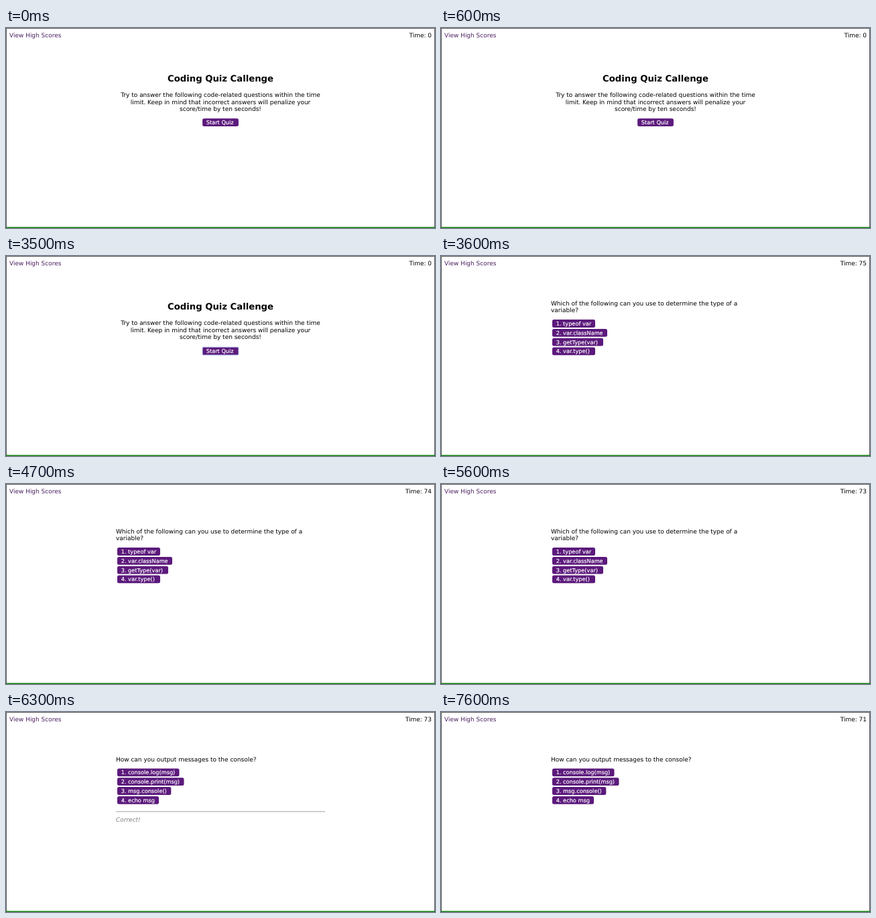
Write an HTML page that moves like this. It is 640x299 px and loops after 8000 ms.

```html
<!DOCTYPE html>
<html lang="en">
<head>
<meta charset="utf-8">
<title>Coding Quiz</title>
<style>
  html, body { margin: 0; width: 100%; height: 100%; overflow: hidden; background: #fff; }
  svg { display: block; width: 100%; height: 100%; }
  text { font: 8.97px "DejaVu Sans", sans-serif; text-rendering: geometricPrecision; white-space: pre; }
  .title { font-size: 13.2px; font-weight: bold; }
  .middle { text-anchor: middle; }
  .end { text-anchor: end; }
  .link { fill: #4b2162; }
  .feedback { fill: #808080; font-style: italic; }
  .button rect { fill: #5c1a7c; }
  .button text { fill: #fff; stroke: #fff; stroke-width: .2px; font-size: 8.2px; }
  .button.focused rect { stroke: #a9b4e6; stroke-width: 1px; }
</style>
</head>
<body>
<svg viewBox="0 0 640 299">
  <path d="M.5 298V.5H639.5V298" fill="none" stroke="#555"/>
  <rect y="297.5" width="640" height="1.5" fill="#107c10"/>
  <text class="link" x="5" y="13.8">View High Scores</text>
  <text class="end" id="timer" x="635" y="13.8"></text>
  <g id="screen"></g>
</svg>
<script>
const LOOP = 8000;
const START_CLICK = 3500, QUIZ_START = 3600;
const ANSWER_CLICK = 6200, NEXT_QUESTION = 6300, FEEDBACK_END = 7300;
const LINE = 10.6, BUTTON_PITCH = 13.8;

const timer = document.getElementById("timer");
const screen = document.getElementById("screen");

const text = (x, y, content, style = "") =>
  `<text class="${style}" x="${x}" y="${y}">${content}</text>`;

const lines = (x, y, rows, style) =>
  rows.map((row, i) => text(x, y + i * LINE, row, style)).join("");

function button(x, y, width, label, focused = false) {
  return `<g class="button ${focused ? "focused" : ""}">
    <rect x="${x}" y="${y}" width="${width}" height="11.8" rx="${focused ? 1.5 : 2.5}"/>
    ${text(x + 5.7, y + 8.9, label)}</g>`;
}

function intro(focused) {
  return text(320, 80.4, "Coding Quiz Callenge", "title middle")
    + lines(320, 103.1, [
      "Try to answer the following code-related questions within the time",
      "limit. Keep in mind that incorrect answers will penalize your",
      "score/time by ten seconds!"
    ], "middle")
    + button(293.1, focused ? 136.2 : 135.2, 53.8, "Start Quiz", focused);
}

function question(rows, answers, focused = false) {
  const top = 73.9 + LINE * rows.length;
  return lines(164, 73.8, rows) + answers.map(([label, width], i) => {
    const pressed = focused && i === 0;
    const shift = focused ? (pressed ? 1 : 2) : 0;
    return button(166 + (pressed ? 1 : 0), top + i * BUTTON_PITCH + shift,
      width, `${i + 1}. ${label}`, pressed);
  }).join("");
}

const typeQuestion = focused => question(
  ["Which of the following can you use to determine the type of a", "variable?"],
  [["typeof var", 64], ["var.className", 82], ["getType(var)", 76], ["var.type()", 64]],
  focused);

const consoleQuestion = () => question(
  ["How can you output messages to the console?"],
  [["console.log(msg)", 92.5], ["console.print(msg)", 99.5], ["msg.console()", 80.3], ["echo msg", 62]]);

const feedback = () =>
  `<rect x="164" y="148.3" width="312" height="1.1" fill="#aaa"/>`
  + text(164, 163.9, "Correct!", "feedback");

function render(t) {
  if (t < QUIZ_START) return intro(t >= START_CLICK);
  if (t < NEXT_QUESTION) return typeQuestion(t >= ANSWER_CLICK);
  return consoleQuestion() + (t < FEEDBACK_END ? feedback() : "");
}

let shown;
function frame() {
  const t = performance.now() % LOOP;
  const seconds = t < QUIZ_START ? 0 : 75 - Math.floor((t - QUIZ_START) / 1000);
  timer.textContent = `Time: ${seconds}`;
  const markup = render(t);
  if (markup !== shown) screen.innerHTML = shown = markup;
  requestAnimationFrame(frame);
}
frame();
</script>
</body>
</html>
```
